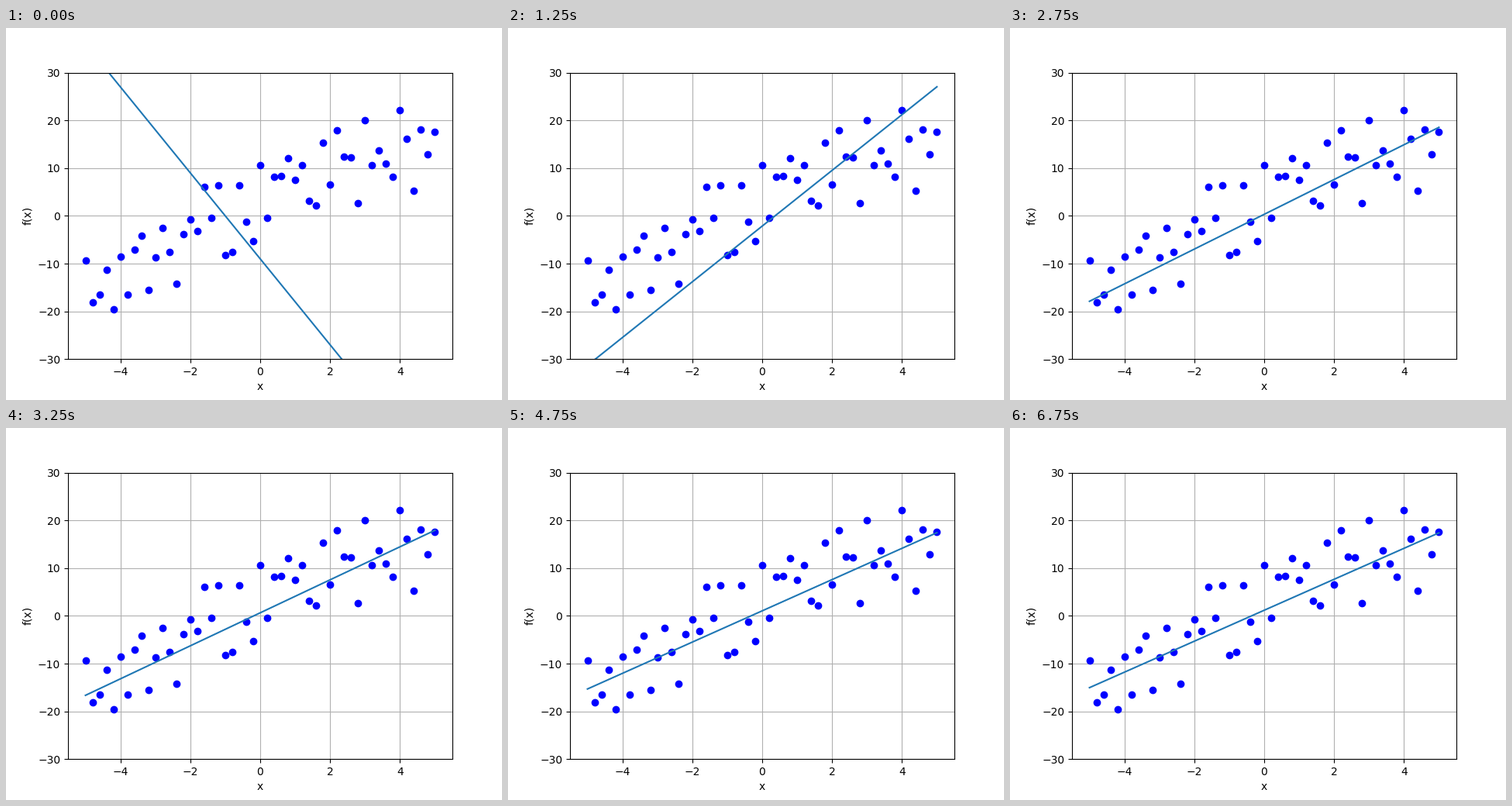
A matplotlib script that plays this animation: 640x480 px, repeating every 7 s.

```python
import matplotlib.pyplot as plt
import numpy as np
from matplotlib.animation import FuncAnimation

STEPS = 28
INTERVAL = 250

# Gradient descent on a straight line: each coefficient closes in on its
# optimum by a constant factor per step (x is symmetric, so they decouple).
RATE = 0.1
START = -9.0
BEST_SLOPE, BEST_OFFSET = 3.24, 1.2

x = np.linspace(-5, 5, 51)
y = np.array([
    -9.4, -18.1, -16.5, -11.3, -19.6, -8.6, -16.5, -7.1, -4.2, -15.5,
    -8.7, -2.5, -7.6, -14.2, -3.9, -0.7, -3.2, 6.1, -0.4, 6.4,
    -8.2, -7.6, 6.4, -1.2, -5.3, 10.6, -0.4, 8.2, 8.3, 12.1,
    7.5, 10.6, 3.1, 2.2, 15.3, 6.6, 17.9, 12.4, 12.2, 2.7,
    20.0, 10.6, 13.7, 10.9, 8.2, 22.1, 16.1, 5.2, 18.1, 12.9, 17.6,
])


def descend(best, curvature, step):
    """Coefficient after the given number of descent steps."""
    return best + (START - best) * (1 - 2 * RATE * curvature) ** step


def model(step):
    slope = descend(BEST_SLOPE, np.mean(x ** 2), step)
    offset = descend(BEST_OFFSET, 1, step)
    return slope * x + offset


fig, ax = plt.subplots(figsize=(6.4, 4.8), dpi=100)
ax.set(xlim=(-5.5, 5.5), ylim=(-30, 30), xlabel="x", ylabel="f(x)")
ax.grid(True)
ax.plot(x, y, "bo")
line, = ax.plot(x, model(0), color="C0")


def update(step):
    line.set_ydata(model(step))
    return line,


anim = FuncAnimation(fig, update, frames=STEPS, interval=INTERVAL,
                     repeat=True, repeat_delay=0)
plt.show()
```
